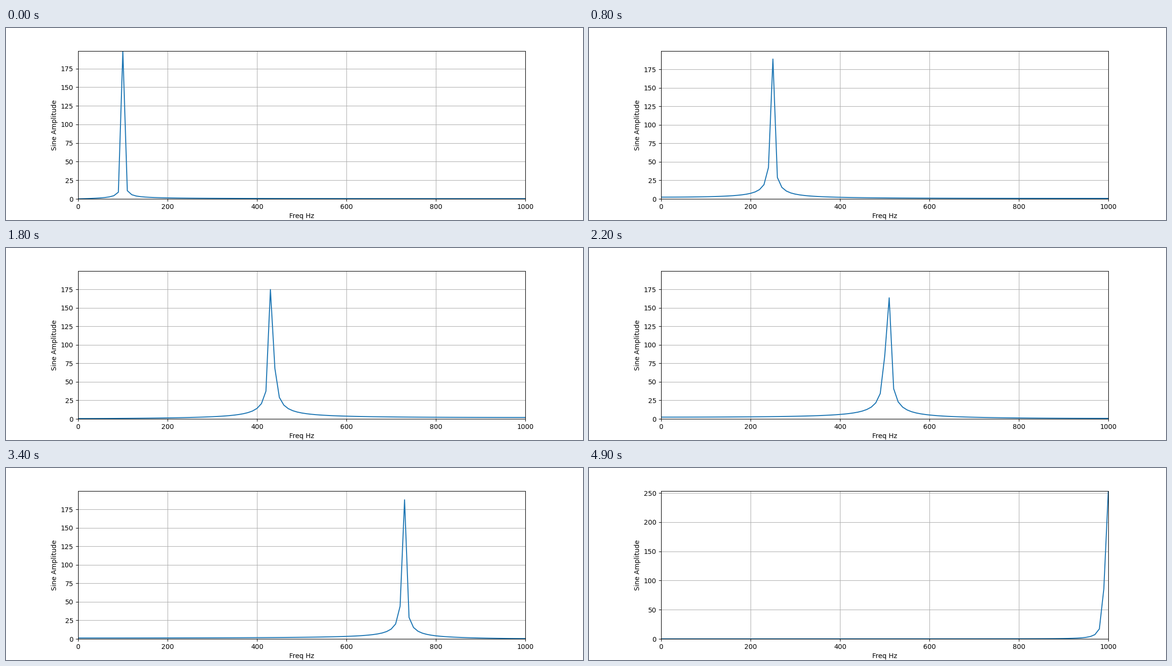
A matplotlib script for the animation above (5000 ms loop, 1200 by 400 pixels).

```python
import numpy as np
import matplotlib.pyplot as plt
from matplotlib.animation import FuncAnimation

FRAMES = 50
SAMPLES = 200
DURATION = 0.1
AMPLITUDE = 2

# Sine sweep from 100 Hz to 1 kHz, one tone per frame
t = np.linspace(0, DURATION, SAMPLES)
tones = np.linspace(100, 1000, FRAMES)
waves = AMPLITUDE * np.sin(2 * np.pi * tones[:, None] * t)

spectra = np.abs(np.fft.rfft(waves, axis=1))
freqs = np.arange(spectra.shape[1]) / DURATION

# The vertical scale only ever grows during a sweep
tops = np.maximum.accumulate(spectra.max(axis=1))

fig, ax = plt.subplots(figsize=(12, 4), dpi=100)
line, = ax.plot(freqs, spectra[0])
ax.set_xlim(0, 1000)
ax.set_xlabel("Freq Hz")
ax.set_ylabel("Sine Amplitude")
ax.grid(True)


def update(i):
    line.set_ydata(spectra[i])
    ax.set_ylim(0, tops[i])
    return line,


anim = FuncAnimation(fig, update, frames=FRAMES, interval=100, repeat=True,
                     repeat_delay=0, init_func=lambda: update(0), blit=False)
plt.show()
```
